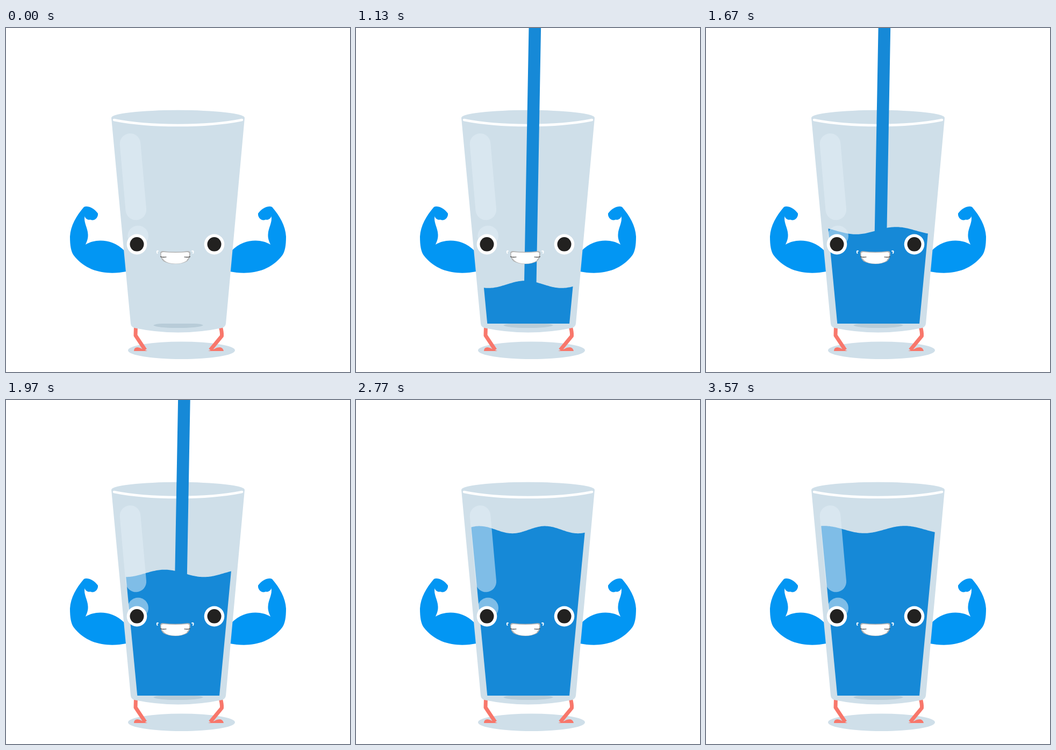
Recreate the animation shown at these times as an HTML page with a canvas. Size 640 by 640 pixels, loop 3610 ms.

```html
<!DOCTYPE html>
<html lang="en">
<head>
<meta charset="utf-8">
<title>Strong glass of water</title>
<style>
  html, body { margin: 0; width: 100%; height: 100%; overflow: hidden; background: #fff; }
  canvas { display: block; width: 640px; height: 640px; }
</style>
</head>
<body>
<canvas id="stage" width="640" height="640"></canvas>
<script>
const ctx = document.getElementById('stage').getContext('2d');
const LOOP = 3610;
const FALL_SPEED = 1.1;
const POUR_START = 130;
const POUR_END = 2055;
const FLOOR = 550;

const GLASS = '#cfdfe9';
const WATER = '#1689d7';
const SKIN = '#0296f3';
const LEG = '#f8776b';

const shapes = {
  arm: new Path2D('M224 453C193 459 152 457 126 423C121 416 119 405 119 388C120 368 131 349 145 333C151 330 163 334 171 345C172 353 164 360 157 356.5C152 358 147 354 146.5 350C144 362 152 371 152.5 384C153 392 150 398 148 403C165 392 197 391 220 414Z'),
  leftLeg: new Path2D('M241.5 555L241 572L259 599'),
  rightLeg: new Path2D('M399 555Q402 566 401.5 573L380 599'),
  leftFoot: new Path2D('M238 601Q238 594 245 594Q250 595 253 597L263 601Z'),
  rightFoot: new Path2D('M376 601L388 597Q392 594 398 594Q404 595 405 601Z'),
  body: new Path2D('M196 167L232 550Q232.5 556 239 558Q320 575 402 558Q408 556 409 550L444 167Z'),
  rim: new Path2D('M201 171Q250 181 320 181Q390 181 439 171'),
  dimple: new Path2D('M274 553Q279 550 291 550H350Q363 550 367 553Q359 558 320 558Q281 558 274 553Z'),
  mouth: new Path2D('M287 419Q287 415 292 415Q315 418 338 415Q343 415 343 419Q343 429 337 434Q328 439 315 439Q302 439 293 434Q287 429 287 419Z'),
  teeth: new Path2D('M288.5 420Q289 417 293 417Q315 419 337 417Q341 417 341 420L340 427Q337 430 336 433Q328 438.5 315 438.5Q301 438.5 294 432Q292 429 289.5 427Z'),
  lipLine: new Path2D('M287.5 425.5Q292 427 298 426M342.5 425.5Q338 427 332 426'),
  dimples: new Path2D('M283 415Q279.5 414 281.5 419M346 415Q350 414 348 419')
};

// Piecewise linear track of [time, value] pairs
function track(points, t) {
  let i = 1;
  while (i < points.length - 1 && t > points[i][0]) i++;
  const [t0, v0] = points[i - 1], [t1, v1] = points[i];
  const p = Math.min(1, Math.max(0, (t - t0) / (t1 - t0)));
  return v0 + (v1 - v0) * p;
}

const levelTrack = [[640, 560], [1130, 477], [1370, 431.5], [1970, 322.5], [2330, 257], [2500, 241.5], [3610, 241]];
const cycleTrack = [[640, -0.66], [1130, 0.04], [1370, 0.38], [1970, 1.17], [2770, 1.74], [3570, 2.67], [3610, 2.72]];
const lengthTrack = [[1130, 136], [1370, 152], [1970, 146], [2770, 122], [3570, 150]];
const swayTrack = [[530, 0], [1130, 2], [1970, 0.6], [2300, 0]];

function fill(path, color) {
  ctx.fillStyle = color;
  ctx.fill(path);
}

function stroke(path, color, width, cap = 'round') {
  ctx.strokeStyle = color;
  ctx.lineWidth = width;
  ctx.lineCap = cap;
  ctx.lineJoin = 'round';
  ctx.stroke(path);
}

function oval(x, y, rx, ry, color) {
  ctx.fillStyle = color;
  ctx.beginPath();
  ctx.ellipse(x, y, rx, ry, 0, 0, Math.PI * 2);
  ctx.fill();
}

function drawLimbs() {
  oval(326.5, 599.7, 99.5, 16.3, GLASS);
  for (const side of ['left', 'right']) {
    stroke(shapes[side + 'Leg'], LEG, 7, 'butt');
    fill(shapes[side + 'Foot'], LEG);
  }
  fill(shapes.arm, SKIN);
  ctx.save();
  ctx.translate(640, 0);
  ctx.scale(-1, 1);
  fill(shapes.arm, SKIN);
  ctx.restore();
}

function drawGlass() {
  fill(shapes.body, GLASS);
  oval(320, 167, 124, 14.2, GLASS);
  stroke(shapes.rim, '#fff', 4.6);
  fill(shapes.dimple, '#b8ccd8');
}

function drawStream(t) {
  if (t < POUR_START) return;
  const head = Math.min((t - POUR_START) * FALL_SPEED + 1, FLOOR - 2);
  const tail = Math.max((t - POUR_END) * FALL_SPEED, -30);
  const limit = Math.min(FLOOR, track(levelTrack, t) + 12);
  if (tail >= limit) return;
  const sway = track(swayTrack, t);
  const centerX = y => 330.8 + sway - y * 0.018;
  ctx.save();
  ctx.beginPath();
  ctx.rect(0, 0, 640, limit);
  ctx.clip();
  const line = new Path2D();
  const top = tail + 11;
  const bottom = Math.max(head - 11, top - 22);
  line.moveTo(centerX(top), top);
  line.lineTo(centerX(bottom), bottom);
  stroke(line, WATER, 22.6);
  ctx.restore();
}

function drawWater(t) {
  if (t < 640) return;
  const level = track(levelTrack, t);
  const cycle = track(cycleTrack, t);
  const length = track(lengthTrack, t);
  const surface = x => level - 6.8 * Math.cos(2 * Math.PI * ((x - 320) / length + cycle));
  ctx.save();
  ctx.beginPath();
  ctx.moveTo(244.3, FLOOR);
  ctx.lineTo(205.2, 140);
  ctx.lineTo(435.8, 140);
  ctx.lineTo(397, FLOOR);
  ctx.clip();
  ctx.beginPath();
  ctx.moveTo(200, 560);
  for (let x = 200; x <= 440; x += 2) ctx.lineTo(x, Math.min(560, surface(x)));
  ctx.lineTo(440, 560);
  ctx.fillStyle = WATER;
  ctx.fill();
  ctx.restore();
}

function drawShine() {
  const color = 'rgba(228,239,247,0.51)';
  stroke(new Path2D('M231 215.5L241.8 338'), color, 38.6);
  oval(245.7, 387, 19.3, 19.3, color);
}

function drawFace() {
  for (const x of [243.5, 387.5]) {
    oval(x, 402.5, 18.8, 19, '#fff');
    oval(x, 402.3, 13, 13.2, '#222120');
  }
  fill(shapes.mouth, '#b4b4b4');
  fill(shapes.teeth, '#fff');
  stroke(shapes.lipLine, '#333', 1.2);
  stroke(shapes.dimples, '#fff', 2);
}

function draw(now) {
  const t = now % LOOP;
  ctx.fillStyle = '#fff';
  ctx.fillRect(0, 0, 640, 640);
  drawLimbs();
  drawGlass();
  drawStream(t);
  drawWater(t);
  drawShine();
  drawFace();
}

let start;
function tick(now) {
  start ??= now;
  draw(Math.max(0, now - start));
  requestAnimationFrame(tick);
}
draw(0);
requestAnimationFrame(tick);
</script>
</body>
</html>
```
